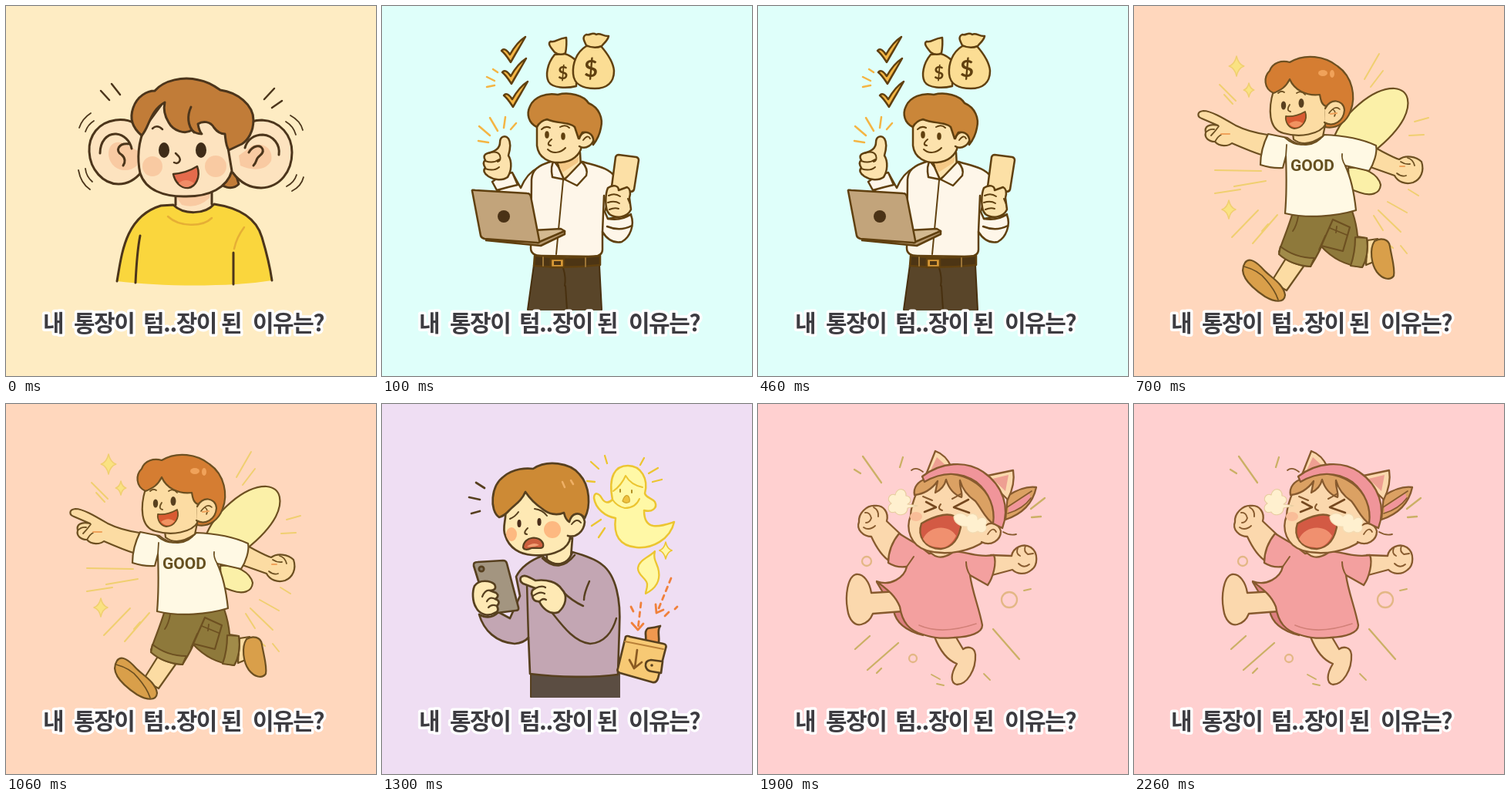
An HTML page with a canvas that plays this animation: 480 px wide and 480 px high, repeating every 2500 ms.

```html
<!DOCTYPE html>
<html lang="ko">
<head>
<meta charset="utf-8">
<style>
html, body { margin: 0; width: 100%; height: 100%; overflow: hidden; }
canvas { display: block; width: 480px; height: 480px; }
</style>
</head>
<body>
<canvas id="stage" width="480" height="480"></canvas>
<script>
const ctx = document.getElementById('stage').getContext('2d');
ctx.lineCap = ctx.lineJoin = 'round';
let ink = '#000', weight = 3;

function fill(color, d) {
  ctx.fillStyle = color;
  ctx.fill(new Path2D(d));
}
function line(d, color = ink, w = weight) {
  ctx.strokeStyle = color;
  ctx.lineWidth = w;
  ctx.stroke(new Path2D(d));
}
function shape(color, d, edge = ink, w = weight) {
  fill(color, d);
  line(d, edge, w);
}
function oval(color, x, y, rx, ry = rx, edge) {
  ctx.beginPath();
  ctx.ellipse(x, y, rx, ry, 0, 0, 7);
  if (color) { ctx.fillStyle = color; ctx.fill(); }
  if (edge) { ctx.strokeStyle = edge; ctx.lineWidth = weight; ctx.stroke(); }
}
function label(text, x, y, font, color) {
  ctx.font = font;
  ctx.fillStyle = color;
  ctx.fillText(text, x, y);
}
function sparkle(x, y, r, color, edge) {
  const q = r * 0.18, s = r * 0.75;
  shape(color, `M${x} ${y - r}Q${x + q} ${y - q} ${x + s} ${y}Q${x + q} ${y + q} ${x} ${y + r}` +
    `Q${x - q} ${y + q} ${x - s} ${y}Q${x - q} ${y - q} ${x} ${y - r}Z`, edge, 1.5);
}
function setup(bg, color, w) {
  ctx.fillStyle = bg;
  ctx.fillRect(0, 0, 480, 480);
  ink = color;
  weight = w;
}

function bigEars() {
  setup('#feecc3', '#4c351b', 3);
  const skin = '#fde3bf', hair = '#c17c38', blush = '#f9caa2';
  shape(skin, 'M181 166C172 152 158 146 142 148C120 151 107 168 108 189C109 212 126 231 146 231C158 231 168 225 176 215');
  fill(blush, 'M133 192C133 178 144 173 156 180L171 188L170 207C155 220 134 211 133 192Z');
  line('M122 191C122 176 131 165 143 166C153 167 161 175 163 185M160 179C146 177 141 188 150 193C155 197 155 203 152 207');
  shape(hair, 'M276 222C277 237 294 239 302 231L296 211Z');
  shape(skin, 'M289 184C297 160 313 148 332 148C356 149 371 168 371 190C371 214 356 235 331 236C315 236 303 228 294 216');
  fill(blush, 'M302 194L320 181C336 176 347 187 344 201C337 214 319 214 304 207Z');
  line('M310 184C313 173 322 167 333 167C347 168 356 180 354 193M315 190C320 181 330 179 333 186C335 193 326 194 325 200C324 203 323 205 321 207');
  fill(skin, 'M219 238L220 258C227 273 263 273 267 257L266 236Z');
  fill(blush, 'M221 248Q246 250 265 240L264 249Q248 264 228 258Z');
  fill('#fad63d', 'M144 357C150 323 154 273 201 259L217 258C230 271 258 271 270 257C304 262 325 276 332 300C338 320 342 335 345 356C290 365 200 364 144 357Z');
  line('M144 357C150 323 154 273 201 259L217 258C230 271 258 271 270 257C304 262 325 276 332 300C338 320 342 335 345 356');
  line('M220 248V258M267 242V257M174 298C170 318 169 338 168 359M295 320V361');
  line('M210 273C225 287 255 287 267 275M296 315C298 305 303 295 309 287', '#e6af35', 2.5);
  shape(skin, 'M181 156C171 176 170 199 174 217C181 239 205 247 230 247C265 248 287 235 293 214L288 184L280 138L206 122Z');
  shape(hair, 'M176 168C164 158 160 146 165 132C170 117 183 110 193 110C205 96 230 91 250 96C262 98 271 104 278 109C300 112 321 128 321 148C321 163 314 174 306 179L289 187C285 181 285 174 284 166C277 166 273 162 270 158C265 149 255 149 249 153C250 159 251 163 254 166C248 166 244 164 241 161C232 167 217 162 211 151C206 143 204 134 206 125C186 136 186 158 176 168Z');
  line('M240 131C235 142 235 155 244 164');
  line('M190 159Q196 153 203 160M218 203C224 206 228 200 224 195L220 191', ink, 2.5);
  oval('#3f2c18', 205, 187, 7, 10);
  oval('#3f2c18', 253, 187, 7, 10);
  oval(blush, 190, 208, 13);
  oval(blush, 272, 208, 14);
  shape('#e56b4c', 'M217 218C229 217 240 213 248 208C253 222 246 235 236 236C226 236 219 228 217 218Z', ink, 2.5);
  fill('#f18c67', 'M224 230Q233 222 244 230Q234 240 224 230Z');
  line('M137 101L148 115M123 110L134 122M335 121L348 107M345 132L358 123', ink, 2.5);
  line('M110 139Q99 146 95 158M114 149Q106 154 103 163M94 213Q97 230 109 238M103 211Q104 221 112 228M369 142Q382 149 385 161M363 150Q373 156 376 167M386 222Q383 234 371 240M377 219Q374 229 364 234', ink, 1.8);
}

function worker() {
  setup('#dffffa', '#60400f', 2.5);
  const skin = '#fce2ad', gold = '#f4b544', white = '#fef6e9', bag = '#fbdd94';
  for (const [x, y] of [[0, 0], [1, 28], [3, 58]]) {
    ctx.save();
    ctx.translate(x, y);
    shape(gold, 'M155 58C158 54 162 57 166 63C171 54 178 45 186 40C180 51 173 62 167 73C163 67 160 62 155 58Z');
    ctx.restore();
  }
  line('M144 82L150 86M136 92L146 97M136 105L146 103M140 145L150 162M160 144L158 158M126 156L140 168M125 175L138 177M174 152L167 160', gold, 2.5);
  shape(bag, 'M224 63C214 75 212 90 216 98C221 107 240 107 252 104L253 72Q245 64 237 62Z');
  shape(bag, 'M224 60C219 54 214 48 219 46C225 48 228 42 239 41Q240 50 238 61Q231 65 224 60Z');
  shape(bag, 'M265 52C252 60 247 75 248 88C249 103 263 107 276 107C291 107 301 100 301 84C300 72 291 60 284 52Z');
  shape(bag, 'M265 51C262 45 259 40 265 37C270 39 272 33 278 37C283 34 287 40 294 39C293 45 287 49 285 52Q275 56 265 51Z');
  label('$', 228, 95, '700 23px Lato, sans-serif', ink);
  label('$', 262, 92, '700 31px Lato, sans-serif', ink);

  fill('#594529', 'M197 334L189 395H285L282 334Z');
  line('M197 336L189 394M282 336L285 394M238 363L240 394M235 340Q239 352 237 363', '#48300f', 2);
  shape(white, 'M170 218L180 236Q188 217 202 210L196 252L148 244Z');
  shape(white, 'M222 201C200 207 195 214 194 225L193 314Q193 324 207 324L275 325Q286 324 286 316L286 293Q296 309 311 306C322 300 328 284 323 271L293 276L289 267L302 222C296 210 276 207 260 202L241 211Z');
  line('M288 246L286 293M293 276Q311 279 323 270M292 286Q309 293 324 285');
  line('M235 226L226 322', ink, 2);
  shape(white, 'M143 228Q156 218 169 216L176 232Q163 235 149 239Z');
  shape(skin, 'M226 194L230 213L236 225L258 208L257 190Z');
  fill('#f5c987', 'M228 202Q246 203 256 195L254 203L234 216Z');
  shape(white, 'M223 201Q218 208 221 222L236 225L229 209ZM259 202Q268 211 265 220L253 233L237 225Z');
  shape(skin, 'M201 148L201 181C203 198 218 204 232 203C247 202 257 193 259 182L256 144Z');
  shape(skin, 'M256 172C258 162 273 160 275 170C275 180 264 187 256 182');
  line('M261 174Q267 166 270 172', ink, 1.8);
  shape('#ca8639', 'M201 157C190 152 187 140 192 130C197 118 213 112 228 115C243 111 262 116 268 126C282 132 287 146 284 158C282 169 278 175 274 180C276 169 270 162 260 164L255 172L250 157C243 150 228 153 214 147Q205 149 201 157Z');
  line('M207 160Q212 155 218 158M231 157Q238 153 243 158M220 173Q212 180 219 181M215 186C221 192 232 191 238 184', ink, 2);
  oval(ink, 214, 167, 2.8, 4.8);
  oval(ink, 235, 169, 2.8, 4.8);

  shape(skin, 'M137 191C146 189 153 185 153 177C153 169 160 167 164 172C168 178 166 187 164 194C169 202 168 214 163 222C156 227 146 226 138 221C132 217 131 213 134 210C131 205 131 202 134 200C131 195 133 192 137 191Z');
  line('M134 201Q144 205 152 199M134 211Q145 215 152 209M138 191Q150 187 153 194Q155 201 150 202', ink, 2);
  shape('#fce0a6', 'M307 193L330 196Q333 197 333 200L327 238Q326 241 322 241L300 238Q297 237 298 234L303 196Q304 193 307 193Z');
  shape(skin, 'M293 236C300 231 307 233 307 239L318 235Q324 238 321 249L323 264C318 275 303 276 295 270C288 263 290 243 293 236Z');
  line('M294 246Q302 242 309 247M293 255Q302 252 308 256M295 264Q302 261 307 263M319 250L322 257', ink, 2);
  shape('#d3b990', 'M196 291L232 289L237 292L205 307Z');
  shape('#b89a70', 'M204 306L237 292V296L206 311L135 304Z');
  shape('#c2a47b', 'M117 240Q116 238 121 239L188 243Q192 243 193 247L204 304Q205 308 201 307L133 302Q129 301 128 298Z');
  oval('#4a3216', 158, 273, 8);
  shape('#4d3514', 'M198 324Q240 329 283 324V336Q240 341 197 337Z');
  shape('#d99a37', 'M219 328H236V339H219Z');
  fill('#4d3514', 'M223 331H232V336H223Z');
  line('M209 326V337M264 327V338', '#9b7436', 2);
}

function fairy() {
  setup('#ffd7bd', '#6d5021', 2.2);
  const skin = '#fcdca3', hair = '#d57d32', olive = '#8e793b', white = '#fff9e4', ray = '#f0cf70';
  line('M111 102L132 123M117 115L128 127M318 62L299 95M323 84L307 105M382 145L364 150M376 167L357 168M105 213L165 214M105 243L138 238M130 234L171 227M127 300L161 265M154 308L186 271M166 292L174 283M317 265L346 293M329 254L354 268M311 272L323 291M356 238L369 246M327 306L336 314M346 311L354 321', ray, 2);
  sparkle(133, 78, 13, '#fae282', ray);
  sparkle(149, 109, 9, '#fae282', ray);
  sparkle(123, 264, 12, '#fae282', ray);
  shape('#fbf0a8', 'M258 174C270 140 310 106 338 107C358 109 359 128 350 146C340 165 322 180 312 188L270 196Z');
  shape('#fbf0a8', 'M278 210C300 208 317 219 320 232C319 244 307 247 293 242L279 237Z');

  shape(skin, 'M303 304L316 302L318 329L301 336Z');
  shape('#d99f4a', 'M312 305C320 300 331 302 332 312C334 325 339 340 337 350C332 357 322 354 315 345C308 335 305 316 312 305Z');
  shape(skin, 'M198 326L178 358L198 369L222 335Z');
  shape('#d99f4a', 'M144 333C150 325 160 333 168 342C176 351 194 360 196 375C195 386 182 384 170 377C149 363 135 347 144 333Z');
  line('M143 338C154 341 165 347 171 355C178 363 184 372 187 381', ink, 1.8);
  shape(olive, 'M206 268C200 288 193 304 188 319C198 332 215 337 229 338C235 328 240 320 243 312C258 328 274 336 296 339C302 330 304 315 302 301L290 299C289 285 286 275 283 266Z');
  shape('#a18b49', 'M190 312Q209 327 234 327L229 338Q203 336 188 322ZM287 300L302 301Q305 324 296 339L281 337Q287 320 287 300Z');
  shape(olive, 'M258 277L280 287L271 318L243 311Z');
  line('M254 288L276 297M263 286L262 294M240 316L248 298M213 273Q211 285 206 292', ink, 1.8);

  shape(skin, 'M173 167C153 164 142 160 132 155C115 145 100 136 90 136C81 137 82 144 88 146L109 155C97 152 91 157 93 164C91 171 97 176 105 176C111 183 122 182 127 178C143 185 155 190 168 194Z');
  line('M110 156Q105 163 100 168M93 164Q98 159 104 160M105 176Q109 169 113 167', ink, 1.8);
  shape(skin, 'M309 182C325 190 335 196 344 199C352 193 366 195 373 202C377 214 372 225 362 229C352 232 342 228 338 220L304 208Z');
  line('M355 197Q362 199 364 207M346 202Q352 206 358 205M341 217Q347 222 353 220', ink, 1.8);
  shape(white, 'M174 166C168 178 164 192 164 206Q179 211 193 210L197 195C198 222 198 246 196 269C226 276 261 273 288 265C286 246 282 224 274 207L305 214C311 205 316 190 314 181C295 172 272 168 246 167C234 184 213 183 199 171Z');
  line('M197 195L198 180M274 207Q269 199 270 192M196 171Q217 190 246 168', ink, 1.8);
  label('GOOD', 203, 214, '700 21px Roboto, sans-serif', '#655020');

  shape(skin, 'M205 157L207 173Q222 185 245 169L249 150Z');
  shape(skin, 'M181 110C174 133 174 160 194 165C215 171 241 167 249 153L251 115L206 88Z');
  shape(hair, 'M181 113C168 107 168 92 176 84C180 73 192 70 202 73C222 61 248 65 264 78C284 92 288 118 281 136C276 150 264 160 248 157L249 130C243 128 242 121 241 115C223 117 208 109 202 95C197 105 191 109 181 113Z');
  shape(skin, 'M248 133C254 119 272 121 273 135C272 149 259 158 247 151');
  line('M253 139Q261 128 267 134M258 134Q263 138 260 143', ink, 1.6);
  oval('#f0a25a', 245, 87, 6, 4);
  oval('#f0a25a', 257, 88, 3, 5);
  oval('#58401f', 194, 129, 3.2, 5.5);
  oval('#58401f', 217, 126, 3.5, 6);
  line('M187 113Q191 109 195 112M211 113Q217 109 222 115M202 128Q197 136 203 137', ink, 1.8);
  shape('#d95b32', 'M197 143C206 144 215 141 222 137C226 148 218 159 208 159C200 158 196 150 197 143Z', ink, 1.8);
  fill('#f19361', 'M201 153Q210 146 219 152Q210 162 201 153Z');
  line('M113 166H124M255 140L263 139M345 208L351 208', '#f0a25a', 2);
}

function shocked() {
  setup('#efdef3', '#57401f', 2.7);
  const skin = '#fee9b4', knit = '#c3a6b3', hair = '#cd8a35', glow = '#fff8a6', gold = '#ecc531', red = '#f0813c';
  fill('#5b4d42', 'M193 345V381H309V346Z');
  line('M193 350V380', ink, 2);
  shape(skin, 'M213 185L214 202Q230 215 245 199L247 174Z');
  shape(knit, 'M208 197C192 203 180 212 174 224L179 249L166 278L151 270Q140 281 126 273C132 294 148 309 172 311Q184 310 190 303L192 350C230 355 275 355 306 351L308 290C310 255 304 222 285 208C275 200 258 195 247 192C240 212 222 212 208 197Z');
  line('M208 200Q230 221 250 196M190 303L188 234M269 230C265 239 262 246 262 254M234 243C243 252 252 258 261 262M220 270C235 289 250 309 270 311C288 310 299 296 304 278', ink, 2.5);
  shape(skin, 'M160 137C162 150 155 160 160 171C165 187 179 195 195 196C215 198 237 192 243 178L250 145L222 103L171 110Z');
  shape(skin, 'M240 149C245 136 262 140 263 153C262 166 251 174 241 171');
  line('M246 156Q253 147 258 154', ink, 2);
  shape(hair, 'M152 147C139 138 141 106 158 94C171 83 188 83 196 84C214 72 244 76 256 91C270 106 271 133 263 148C256 139 246 141 243 153Q238 150 236 141C227 145 216 143 208 136C199 130 192 123 186 114C181 126 173 130 165 138Q159 145 152 147Z');
  line('M234 101L237 108M245 99L248 104', '#efb066', 2.5);
  oval('#fdb981', 221, 163, 11);
  oval('#fdb981', 168, 169, 7, 9);
  oval('#4a2e1b', 178, 155, 2.6, 5);
  oval('#4a2e1b', 204, 153, 2.6, 5);
  line('M166 149Q173 146 177 140M198 136Q208 137 214 145M189 161Q182 168 188 169', ink, 2);
  shape('#cd5f3e', 'M183 186C184 171 205 170 209 181C211 190 202 186 194 187Q185 191 183 186Z', ink, 2.2);
  fill('#f3a075', 'M188 185Q197 178 204 183Q197 186 188 185Z');
  line('M122 102L133 109M113 121L127 124M116 142L127 139', ink, 2.7);

  shape('#a39580', 'M124 205L157 203Q161 203 162 207L177 264Q178 268 173 268L142 272Q138 272 137 268L119 210Q118 205 124 205Z');
  oval('#82745f', 129, 214, 3.2, 3.2, ink);
  shape(skin, 'M120 236C126 227 141 229 146 234C149 240 145 242 140 242L148 245Q153 249 147 253Q155 256 149 262Q153 269 146 271C137 277 126 272 122 264C117 256 117 243 120 236Z');
  line('M130 250Q134 240 141 242M136 256Q140 249 147 253M138 264Q142 259 149 262', ink, 2.2);
  shape(skin, 'M180 225C184 220 192 225 199 229C214 227 227 231 233 240C242 249 238 262 229 270C217 275 207 263 204 256Q196 257 195 249Q192 242 199 239L183 233Q178 230 180 225Z');
  line('M199 239Q208 235 212 238M196 249Q205 242 211 246M204 257Q208 251 213 254', ink, 2.2);

  line('M271 75L281 84M289 67L292 77M340 70L335 79M358 83L346 90M363 98L351 101M266 100L276 101M272 158L284 150M281 173L289 161', gold, 2.3);
  shape(glow, 'M299 124C293 93 303 80 319 80C336 80 346 97 341 116C343 122 350 122 354 127C358 135 350 141 340 138C340 151 345 157 352 158C362 159 370 156 379 153C374 176 350 188 330 186C308 184 300 170 303 148C290 146 277 136 275 122C275 114 281 115 285 122C289 129 294 129 299 124Z', gold, 2.5);
  line('M300 113Q311 105 316 93Q323 105 338 108M299 124Q305 133 315 135Q329 135 334 123', gold, 2);
  line('M309 111V114M324 112V115', '#b08e22', 2);
  shape('#efc23f', 'M312 126Q315 117 319 119Q322 122 321 127Q316 130 312 126Z', '#d0a52a', 1.2);
  shape(glow, 'M354 191C348 198 333 202 332 213C332 224 345 226 344 235C344 240 342 243 342 246C354 240 361 230 359 217C358 207 351 203 354 191Z', gold, 2.3);
  sparkle(368, 190, 11, glow, gold);
  ctx.setLineDash([6, 6]);
  line('M336 258L332 292M375 226L357 270', red, 2.8);
  ctx.setLineDash([]);
  line('M324 284L332 293L339 285M355 260L356 271L365 267M323 263L326 269M383 263L380 266M372 270L367 275', red, 2.8);
  shape('#f0984f', 'M340 313C346 304 338 296 345 291Q354 290 361 288C355 296 363 304 357 316Z');
  shape('#f7c974', 'M316 302Q318 300 322 302L365 311Q370 312 368 317L358 356Q356 362 351 361L309 349Q304 347 306 343Z');
  line('M315 308L365 318', '#b98038', 1.8);
  shape('#f7c974', 'M364 334L349 332Q341 333 342 340Q343 346 350 347L362 349Z');
  oval(ink, 350, 339, 1.8);
  line('M331 319L328 342M321 332L327 343L337 335', '#8a5a22', 2.7);
}

function tantrum() {
  setup('#ffd0d0', '#875a2e', 2.3);
  const skin = '#fbd8ad', hair = '#dba163', pink = '#f0959a', dress = '#f3a09f', ray = '#cbb065', puff = '#fff0cf';
  line('M136 68L160 102M125 85L133 90M188 69L184 82M372 122L354 136M355 147L367 146M126 318L145 301M142 345L182 310M154 349L160 343M305 292L339 331', ray, 2.3);
  line('M345 242L354 240M225 351L236 357M232 363L241 365M293 350L301 358', ray, 1.8);
  for (const [x, y, r] of [[141, 204, 6], [326, 254, 10], [201, 330, 5]]) oval(null, x, y, r, r, '#e3b785');

  shape('#dd7f80', 'M154 231L176 268Q180 291 214 300L210 262Z');
  shape(skin, 'M182 243L147 245C145 232 137 219 127 221C116 224 113 249 116 266C118 281 126 288 134 286C143 284 147 277 149 272L188 269Z');
  shape(skin, 'M229 302C236 320 245 332 258 337C250 350 249 362 258 364C271 364 283 345 282 325C281 315 272 314 266 318L256 301Z');
  shape(skin, 'M185 169L167 152C170 141 163 131 152 132C141 131 130 142 131 153C127 163 137 172 147 172C153 185 160 197 171 204L190 206Z');
  line('M139 141Q145 140 147 148Q145 154 140 154M150 134Q157 138 156 146M137 160Q144 165 152 158', ink, 1.9);
  shape(skin, 'M302 196L329 197C331 186 344 180 354 186C364 193 363 209 355 215C346 223 335 220 330 215L300 223Z');
  line('M337 187Q334 194 340 197M347 184Q344 191 350 195L357 194M338 207Q345 214 352 208', ink, 1.9);
  shape(dress, 'M207 182C199 178 191 173 183 168C174 179 169 193 169 206Q180 213 193 211C190 225 172 237 154 230C168 241 178 248 184 263C187 283 196 294 214 299C232 305 242 304 255 303C275 302 291 297 291 287C287 265 278 244 275 222L298 235C305 225 310 206 306 196C288 199 270 193 253 190L222 194Z');
  line('M193 211L202 198M275 222Q270 214 270 205', ink, 2);
  line('M209 287Q238 300 283 285', '#d28078', 1.7);
  shape(skin, 'M219 186Q231 207 252 193L254 183Z');

  shape(hair, 'M324 119C335 112 347 106 361 108C357 127 345 142 321 150Z');
  fill(pink, 'M325 134L352 116L354 122Q343 137 325 141Z');
  line('M323 134L355 113M324 142Q344 136 354 122', ink, 1.7);
  shape(skin, 'M217 94L230 61Q244 66 251 82ZM293 94L331 86Q334 104 324 124Z');
  fill('#ee9f92', 'M224 86L232 69L243 79ZM304 97L325 92L321 113Z');
  shape(skin, 'M207 112C201 126 198 135 198 145C191 162 198 184 219 190C246 198 278 190 295 177L308 154L286 105L240 92Z');
  shape(hair, 'M203 118C201 108 208 100 218 97C250 81 287 96 303 126C309 140 309 148 306 156C294 148 291 137 282 126C273 120 265 110 262 99C261 108 266 115 264 121C253 117 247 108 244 98C242 107 236 112 230 115L233 100C225 111 214 117 203 118Z');
  shape(skin, 'M292 163C297 151 312 153 315 165C315 177 302 185 290 179');
  line('M298 169Q305 158 309 166', ink, 1.8);
  shape(pink, 'M213 94C238 75 270 73 292 88C318 106 327 134 317 161L305 155C308 135 300 115 283 101C262 87 238 88 216 101Z');
  line('M214 88Q205 81 199 86M318 166Q326 171 335 169', ink, 1.8);
  oval('#f9bd98', 205, 146, 8, 6);
  line('M218 127L231 134L216 140M273 124L254 134L274 141', '#75481f', 2.6);
  line('M214 120L226 125M252 123Q258 120 264 116M237 130Q232 136 239 138', ink, 2);
  shape('#d35a44', 'M212 155C220 150 230 146 240 144C251 142 262 147 264 153C262 172 255 186 237 188C217 188 206 172 212 155Z');
  fill('#f0906f', 'M214 175C222 158 247 155 257 171Q248 188 235 186Q220 186 214 175Z');
  shape(puff, 'M207 132L194 135C194 145 181 146 178 140C169 143 166 133 173 129C165 123 172 115 178 118C180 107 193 109 192 119C199 120 200 127 194 130Z', '#e8cda0', 1.2);
  shape(puff, 'M254 146C258 140 267 141 271 146C278 139 286 144 285 150C292 143 301 151 295 157C300 163 291 170 285 165C277 170 270 165 271 159C263 160 254 154 254 146Z', '#f3dcb4', 1.2);
}

const words = [['내', 48], ['통장이', 88], ['텀..장이', 178], ['된', 279], ['이유는?', 320]];

function caption() {
  ctx.save();
  ctx.letterSpacing = '-1.5px';
  ctx.font = '700 30px "Noto Sans CJK KR", "Noto Sans CJK", sans-serif';
  for (const pass of ['stroke', 'fill']) {
    ctx.strokeStyle = '#fff';
    ctx.lineWidth = 7;
    ctx.fillStyle = '#3d3c41';
    for (const [text, x] of words) ctx[pass + 'Text'](text, x, 422);
  }
  ctx.restore();
}

const scenes = [[100, bigEars], [700, worker], [1300, fairy], [1900, shocked], [2500, tantrum]];
const start = performance.now();

function frame() {
  const t = (performance.now() - start) % 2500;
  scenes.find(([end]) => t < end)[1]();
  caption();
  requestAnimationFrame(frame);
}
frame();
</script>
</body>
</html>
```
